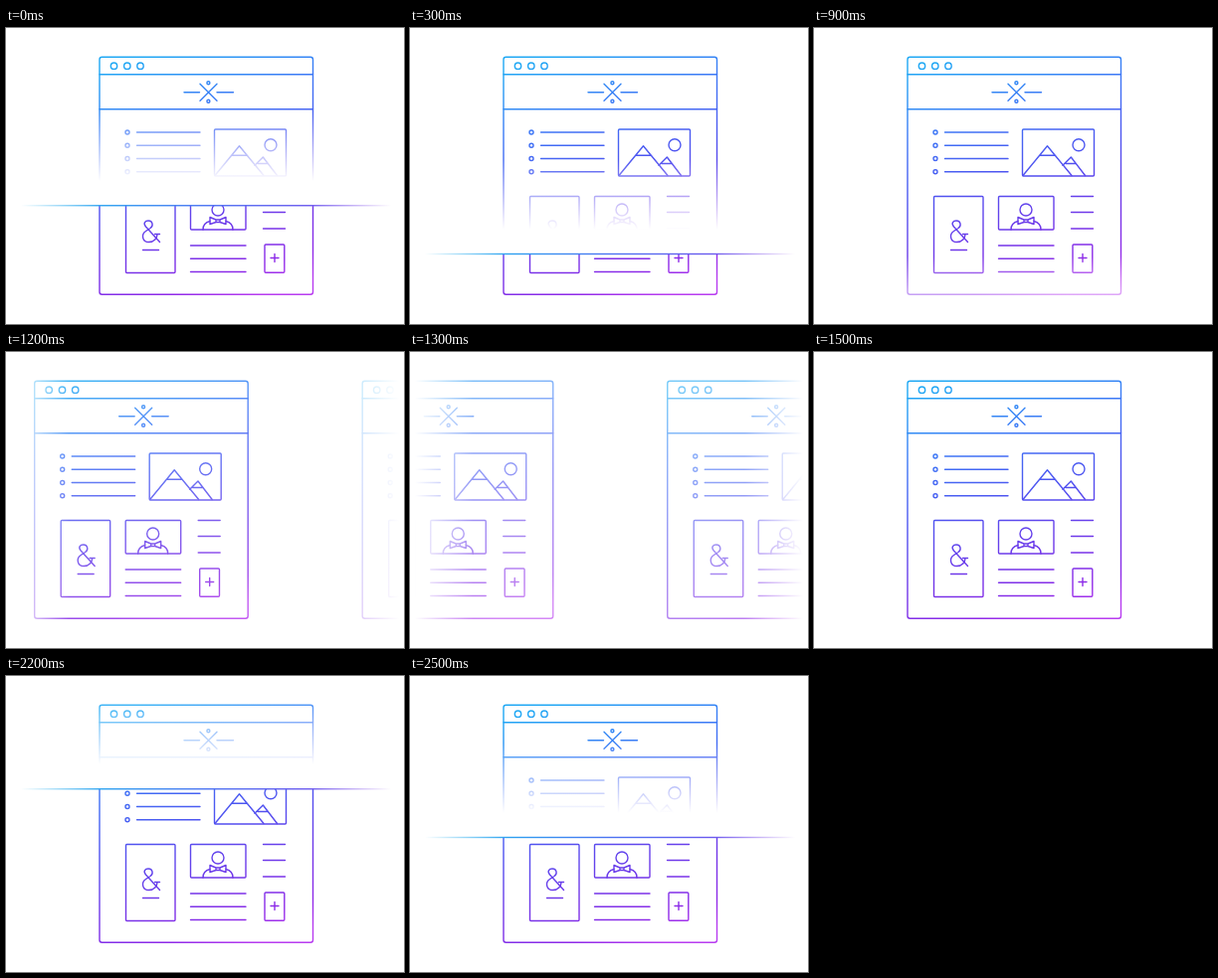
An HTML page that plays this animation: 400 px wide and 298 px high, repeating every 2.6 s.

```html
<!DOCTYPE html>
<html lang="en">
<head>
<meta charset="utf-8">
<title>Page wireframe scan</title>
<style>
  html, body { margin: 0; width: 100%; height: 100%; overflow: hidden; background: #fff; }
  svg { display: block; width: 100%; height: 100%; }
  #page { fill: none; stroke: url(#ink); stroke-width: 1.4; stroke-linecap: round; stroke-linejoin: round; }
</style>
</head>
<body>
<svg viewBox="0 0 400 298">
  <defs>
    <linearGradient id="ink" gradientUnits="userSpaceOnUse" x1="160" y1="22" x2="236" y2="274">
      <stop offset="0" stop-color="#1fa8f4"/>
      <stop offset=".25" stop-color="#3c78f6"/>
      <stop offset=".5" stop-color="#4f52f0"/>
      <stop offset=".75" stop-color="#7434e8"/>
      <stop offset=".9" stop-color="#8f2ae8"/>
      <stop offset="1" stop-color="#b83cf0"/>
    </linearGradient>
    <linearGradient id="beam" gradientUnits="userSpaceOnUse" x1="15" y1="0" x2="387" y2="0">
      <stop offset="0" stop-color="#29b4ee" stop-opacity="0"/>
      <stop offset=".22" stop-color="#2ba2f0"/>
      <stop offset=".5" stop-color="#4a72f2"/>
      <stop offset=".78" stop-color="#6a58ee"/>
      <stop offset="1" stop-color="#8a4ae8" stop-opacity="0"/>
    </linearGradient>
    <linearGradient id="veil" x1="0" y1="0" x2="0" y2="1">
      <stop offset="0" stop-color="#fff" stop-opacity="0"/>
      <stop offset=".74" stop-color="#fff"/>
    </linearGradient>
    <linearGradient id="sides" gradientUnits="userSpaceOnUse" x1="5" y1="0" x2="395" y2="0">
      <stop offset="0" stop-color="#fff"/>
      <stop offset=".15" stop-color="#fff" stop-opacity="0"/>
      <stop offset=".85" stop-color="#fff" stop-opacity="0"/>
      <stop offset="1" stop-color="#fff"/>
    </linearGradient>
    <g id="page"></g>
  </defs>
  <use id="leaving" href="#page"/>
  <use id="coming" href="#page"/>
  <rect width="400" height="298" fill="url(#sides)"/>
  <g id="scan">
    <rect y="-95" width="400" height="95" fill="url(#veil)"/>
    <rect x="15" y="-.7" width="372" height="1.4" fill="url(#beam)"/>
  </g>
</svg>
<script>
const $ = id => document.getElementById(id);
const page = $('page');

function add(tag, attrs) {
  const el = document.createElementNS('http://www.w3.org/2000/svg', tag);
  for (const k in attrs) el.setAttribute(k, attrs[k]);
  page.append(el);
}
const path = d => add('path', { d });
const box = (x, y, right, bottom, rx = 1) =>
  add('rect', { x, y, width: right - x, height: bottom - y, rx });
const ring = (cx, cy, r) => add('circle', { cx, cy, r });
const rule = (x, y, right) => path(`M${x} ${y}H${right}`);

// Window frame
box(94, 29.2, 308.5, 268.3, 2.5);
rule(94, 46.8, 308.5);
rule(94, 81.8, 308.5);
[108.5, 121.8, 135].forEach(x => ring(x, 38.2, 3.2));

// Crossed header ornament
path('M179 64.7H194.5M212 64.7H228.5M195 56.3L212 73.3M212 56.3L195 73.3');
ring(203.4, 55.2, 1.5);
ring(203.4, 73.8, 1.5);

// List
[105, 118.2, 131.5, 144.8].forEach(y => {
  ring(122, y, 2);
  rule(131.5, y, 195);
});

// Landscape
box(209.5, 102, 281.5, 149);
ring(266, 117.8, 6);
path('M210 148.5L234.5 118.8L259 148.5M227 128.2H242.5');
path('M250 138.2L258.3 130L272.5 148.5M253 136.5H263.5');

// Ampersand card
box(120.5, 169.5, 170, 246.5);
path('M154.5 215.5L140.5 200C137.5 196.5 140 194 143 194C147.5 194 148.5 199 145 201.5' +
  'L140.5 204.5C135.5 208 137 215.5 143.5 215.5C149 215.5 152 211.5 152 207.5M149.5 207.5H154.5');
rule(137.5, 223.5, 153.5);

// Portrait and text
box(185.5, 169.5, 241, 203);
ring(213, 183, 6);
path('M198 203C198 198 200.5 195.5 205 194.5M228 203C228 198 225.5 195.5 221 194.5');
path('M205 190.5L211 193L215 193L221 190.5V197.5L215 195.5H211L205 197.5ZM211 193V195.5M215 193V195.5');
[219, 232.3, 245.5].forEach(y => rule(185.5, y, 241));

// Right column
[169.5, 185.5, 202].forEach(y => rule(258.5, y, 280.5));
box(260, 218, 279.8, 246.3);
path('M266 231.5H274M270 227.5V235.5');

const LOOP = 2600, STEP = 100;
const SPAN = 329.5;
const SLIDE = [1100, 1500];
const SCAN_START = 1500, SCAN_SPEED = 0.1625;

function place(el, x, opacity) {
  el.setAttribute('transform', `translate(${x} 0)`);
  el.setAttribute('opacity', opacity);
}

function draw(t) {
  const u = Math.min(1, Math.max(0, (t - SLIDE[0]) / (SLIDE[1] - SLIDE[0])));
  const eased = (1 - Math.cos(Math.PI * u)) / 2;
  const p = (u + eased) / 2;
  place($('leaving'), -SPAN * p, 1 - 0.8 * p);
  place($('coming'), SPAN * (1 - p), 0.2 + 0.8 * p);

  const age = (t - SCAN_START + LOOP) % LOOP;
  const y = age ? age * SCAN_SPEED : -10;
  $('scan').setAttribute('transform', `translate(0 ${y})`);
}

const start = performance.now();
function tick(now) {
  const t = Math.max(0, now - start) % LOOP;
  draw(Math.floor(t / STEP) * STEP);
  requestAnimationFrame(tick);
}
draw(0);
requestAnimationFrame(tick);
</script>
</body>
</html>
```
